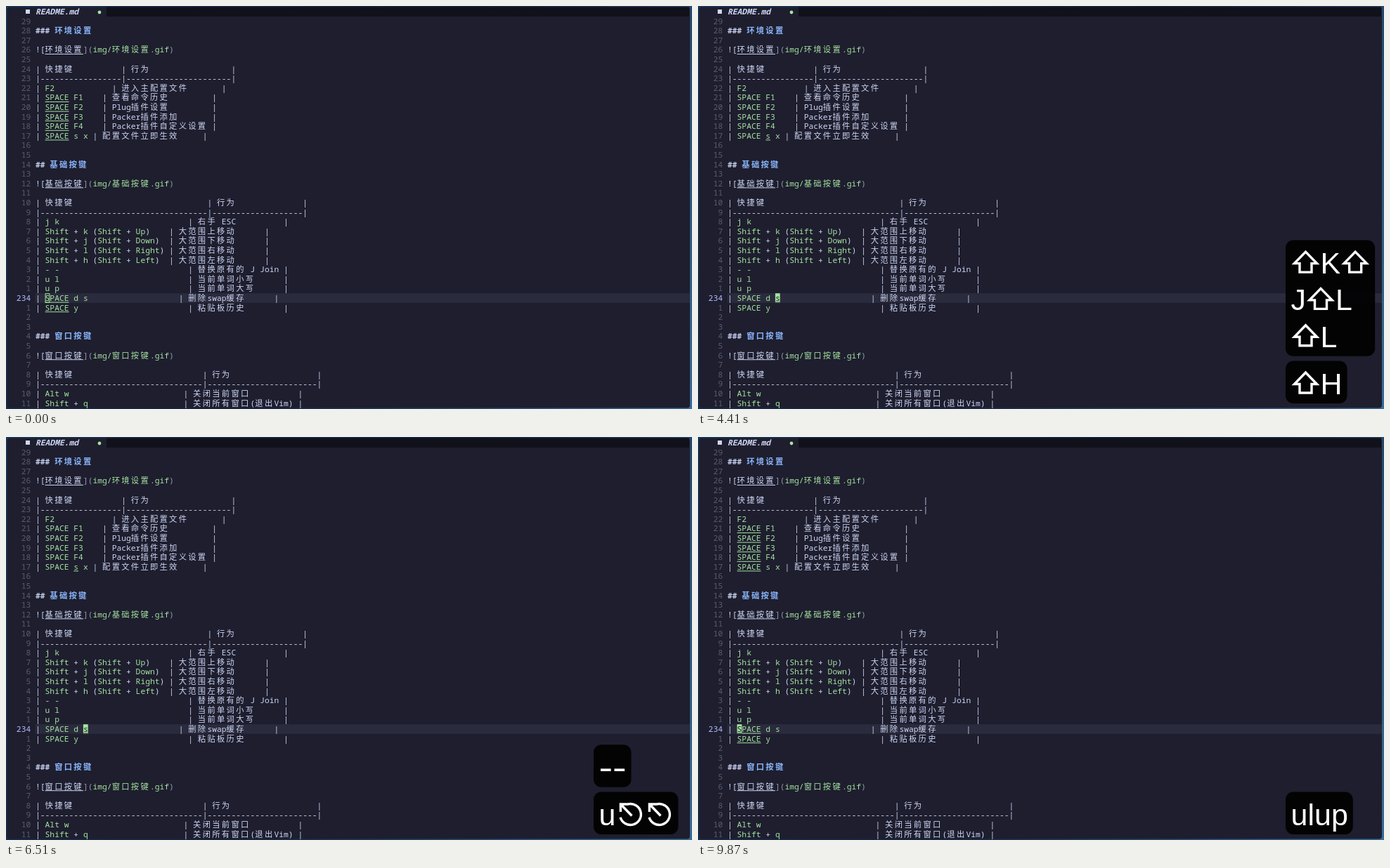
An HTML page with a canvas that plays this animation: 976 px wide and 574 px high, repeating every 9.94 s.

```html
<!DOCTYPE html>
<html lang="zh">
<head>
<meta charset="utf-8">
<style>
  html, body { margin: 0; width: 100%; height: 100%; overflow: hidden; background: #1e1e2e; }
  canvas { display: block; }
</style>
</head>
<body>
<canvas width="976" height="574"></canvas>
<script>
const ctx = document.querySelector('canvas').getContext('2d');
const LOOP = 9940, STEP = 70;
const CELL = 6.79, LINE = 13.6, LEFT = 42, FIRST = 204;
const MONO = '"Noto Sans Mono", "Noto Sans CJK SC", "Noto Sans CJK", monospace';
const CJK = '"Noto Sans CJK SC", "Noto Sans CJK", sans-serif';
const C = {
  base: '#1e1e2e', bar: '#11111b', text: '#cdd6f4', dim: '#9399b2', number: '#585b70',
  current: '#b4befe', line: '#2a2b3c', blue: '#89b4fa', green: '#a6e3a1',
};

// Document: backticks mark inline code and are concealed when drawn.
const isWide = c => c > '\u2e80';
const width = s => [...s].reduce((n, c) => n + (isWide(c) ? 2 : 1), 0);
const row = (key, action, a, b) => {
  const cell = (s, n) => ' ' + s + ' '.repeat(n - 1 - width(s));
  return `|${cell(key, a)}|${cell(action, b)}|`;
};
const section = (level, title, a, b, rows) => [
  `${level} ${title}`, '', `![${title}](img/${title}.gif)`, '',
  row('快捷键', '行为', a, b),
  `|${'-'.repeat(a)}|${'-'.repeat(b)}|`,
  ...rows.map(([key, action]) => row(key, action, a, b)), '', '',
];
const big = (key, arrow, dir) => [`\`Shift\` + \`${key}\` (\`Shift\` + \`${arrow}\`)`, `大范围${dir}移动`];

const original = ['', '',
  ...section('###', '环境设置', 17, 22, [
    ['`F2`', '进入主配置文件'],
    ['`SPACE` `F1`', '查看命令历史'],
    ['`SPACE` `F2`', 'Plug插件设置'],
    ['`SPACE` `F3`', 'Packer插件添加'],
    ['`SPACE` `F4`', 'Packer插件自定义设置'],
    ['`SPACE` `s` `x`', '配置文件立即生效'],
  ]),
  ...section('##', '基础按键', 35, 19, [
    ['`j` `k`', '右手 ESC'],
    big('k', 'Up', '上'), big('j', 'Down', '下'), big('l', 'Right', '右'), big('h', 'Left', '左'),
    ['`-` `-`', '替换原有的 J Join'],
    ['`u` `l`', '当前单词小写'],
    ['`u` `p`', '当前单词大写'],
    ['`SPACE` `d` `s`', '删除swap缓存'],
    ['`SPACE` `y`', '粘贴板历史'],
  ]),
  ...section('###', '窗口按键', 34, 23, [
    ['`Alt` `w`', '关闭当前窗口'],
    ['`Shift` + `q`', '关闭所有窗口(退出Vim)'],
    ['(`Ctrl` + `v`) (`Ctrl` + `v`)', '垂直分屏'],
  ]),
];
const joined = [...original];
joined.splice(30, 2, original[30] + ' ' + original[31]);
const lowered = original.map((s, i) => i === 30 ? s.replace('SPACE', 'space') : s);

// Editor states: start time, cursor row and column, word under the cursor, document.
const states = [
  [0, 30, 2, 'SPACE'], [1470, 21, 3], [1950, 30, 2, 'SPACE'], [2350, 30, 10, 's'],
  [2750, 30, 21], [3700, 30, 10, 's'], [4700, 30, 0, '', joined], [5700, 30, 10, 's'],
  [6900, 30, 2, 'SPACE'], [7550, 30, 3, 'SPACE'], [8800, 30, 2, 'space', lowered],
  [9400, 30, 2, 'SPACE'],
];
const FOCUS = 700, MARK_DELAY = 100;

const keys = [
  [1470, '⇧K'], [1950, '⇧J'], [2350, '⇧L'], [2750, '⇧L'], [3700, '⇧H'], [4500, '-'], [4700, '-'],
  [5700, 'u'], [6000, '⎋'], [6200, '⎋'], [6900, '⇧H'], [7550, 'l'],
  [8650, 'u'], [8800, 'l'], [9250, 'u'], [9400, 'p'],
];
const PAUSE = 600, LINGER = 2000, FADE = 200;

function rect(x, y, w, h, color) {
  ctx.fillStyle = color;
  ctx.fillRect(x, y, w, h);
}

function glyph(ch, x, y, color, style = '') {
  ctx.font = `${style} 11.32px ${isWide(ch) ? CJK : MONO}`;
  ctx.fillStyle = color;
  ctx.fillText(ch, x, y);
}

function parse(text) {
  const cells = [];
  const heading = text[0] === '#', link = text[0] === '!';
  const close = text.indexOf(']');
  let col = 0, code = false;
  [...text].forEach((ch, i) => {
    if (ch === '`') { code = !code; return; }
    const cell = { ch, col, color: code ? C.green : C.text, style: heading ? 'bold' : '' };
    if (heading && ch !== '#') cell.color = C.blue;
    if (link) {
      cell.underline = i > 1 && i < close;
      if (i >= close) cell.color = /[\](){}]/.test(ch) ? C.dim : C.green;
    }
    cells.push(cell);
    col += isWide(ch) ? 2 : 1;
  });
  return cells;
}

function drawLine(text, r, word, cursor) {
  const mid = 8 + LINE * r, cells = parse(text);
  if (word) {
    const plain = cells.map(c => c.ch).join('');
    for (const m of plain.matchAll(new RegExp(`\\b${word}\\b`, 'g')))
      for (let i = 0; i < word.length; i++) cells[m.index + i].underline = true;
  }
  for (const { ch, col, color, style, underline } of cells) {
    const x = LEFT + col * CELL;
    let ink = color;
    if (cursor && cursor.col === col) {
      if (cursor.solid) {
        rect(x, mid - 6.8, CELL, LINE, color);
        ink = C.base;
      } else {
        ctx.strokeStyle = color;
        ctx.strokeRect(x + .5, mid - 6.3, CELL - 1, LINE - 1);
      }
    }
    if (ch !== ' ') glyph(ch, x, mid + 4, ink, style);
    if (underline) rect(x, mid + 5.6, CELL * (isWide(ch) ? 2 : 1), 1, ink);
  }
}

function drawEditor(t) {
  const [start, row, col, word, doc = original] = states.findLast(s => s[0] <= t);
  const mark = start === 0 || t >= start + MARK_DELAY ? word : '';
  rect(LEFT, 1.2 + LINE * row, 973 - LEFT, LINE, C.line);
  for (let r = 1; r < 42; r++) {
    const here = r === row;
    const label = String(here ? FIRST + r : Math.abs(r - row));
    [...label].forEach((d, i) =>
      glyph(d, LEFT - (label.length + 1 - i) * CELL, 12 + LINE * r, here ? C.current : C.number));
    drawLine(doc[r], r, mark, here && { col, solid: t >= FOCUS });
  }
}

function drawWindow() {
  const wall = ctx.createLinearGradient(0, 0, 976, 574);
  wall.addColorStop(0, '#173a5e');
  wall.addColorStop(.5, '#14263f');
  wall.addColorStop(1, '#3b6c96');
  rect(0, 0, 976, 574, wall);
  ctx.fillStyle = C.base;
  ctx.beginPath();
  ctx.roundRect(1.5, 1.5, 971.5, 571, 4);
  ctx.fill();
  rect(143, 1.5, 829, 13.5, C.bar);
  rect(28, 5, 6, 6, C.text);
  [...'README.md'].forEach((c, i) => glyph(c, LEFT + i * CELL, 12, C.text, 'italic bold'));
  ctx.fillStyle = C.green;
  ctx.beginPath();
  ctx.arc(133, 9, 2.4, 0, 7);
  ctx.fill();
}

// Key display
const KEY_FONT = '43px "Liberation Sans", Arial, sans-serif';
const keyWidth = k => ({ '⇧': 42, '⎋': 41, '-': 19.5 })[k] || ctx.measureText(k).width;

function drawKey(k, x, y) {
  ctx.beginPath();
  if (k === '⇧') {
    [[21, -31], [37, -14.5], [29.5, -14.5], [29.5, -2], [12.5, -2], [12.5, -14.5], [5, -14.5]]
      .forEach(([dx, dy]) => ctx.lineTo(x + dx, y + dy));
    ctx.closePath();
    ctx.stroke();
  } else if (k === '⎋') {
    ctx.arc(x + 21, y - 15.5, 15, -1.8, 2.85);
    ctx.moveTo(x + 23, y - 13.5);
    ctx.lineTo(x + 8, y - 29);
    ctx.moveTo(x + 7, y - 19);
    ctx.lineTo(x + 7, y - 30);
    ctx.lineTo(x + 18, y - 30);
    ctx.stroke();
  } else if (k === '-') {
    ctx.fillRect(x + 2.5, y - 13.3, 14.6, 3.6);
  } else {
    ctx.fillText(k, x, y);
  }
}

function wrapKeys(text) {
  const lines = [[]];
  let used = 0;
  for (const k of text) {
    const w = keyWidth(k);
    if (used + w > 120) { lines.push([]); used = 0; }
    lines.at(-1).push(k);
    used += w;
  }
  return lines;
}

function drawKeys(t) {
  const bubbles = [];
  let last = -PAUSE;
  for (const [time, text] of keys) {
    if (time > t) break;
    if (time - last >= PAUSE) bubbles.push({ text: '' });
    const b = bubbles.at(-1);
    b.text += text;
    b.time = last = time;
  }
  ctx.font = KEY_FONT;
  ctx.lineWidth = 3.4;
  let bottom = 566;
  for (const { text, time } of bubbles.reverse()) {
    const alpha = Math.min(1, 1 - (t - time - LINGER) / FADE);
    if (alpha <= 0) break;
    const lines = wrapKeys(text);
    const sum = line => line.reduce((n, k) => n + keyWidth(k), 0);
    const h = 60.5 + (lines.length - 1) * 52.3;
    ctx.globalAlpha = alpha;
    ctx.fillStyle = 'rgba(0,0,0,.9)';
    ctx.beginPath();
    ctx.roundRect(836, bottom - h, Math.max(...lines.map(sum)) + 14.5, h, 11);
    ctx.fill();
    ctx.fillStyle = ctx.strokeStyle = '#fff';
    lines.forEach((line, i) => {
      let x = 843.5;
      const y = bottom - 13 - (lines.length - 1 - i) * 52.3;
      for (const k of line) { drawKey(k, x, y); x += keyWidth(k); }
    });
    bottom -= h + 6.8;
  }
  ctx.globalAlpha = ctx.lineWidth = 1;
}

let shown = -1;
function tick() {
  const t = Math.floor(performance.now() % LOOP / STEP) * STEP;
  if (t !== shown) {
    shown = t;
    drawWindow();
    drawEditor(t);
    drawKeys(t);
  }
  requestAnimationFrame(tick);
}
tick();
</script>
</body>
</html>
```
